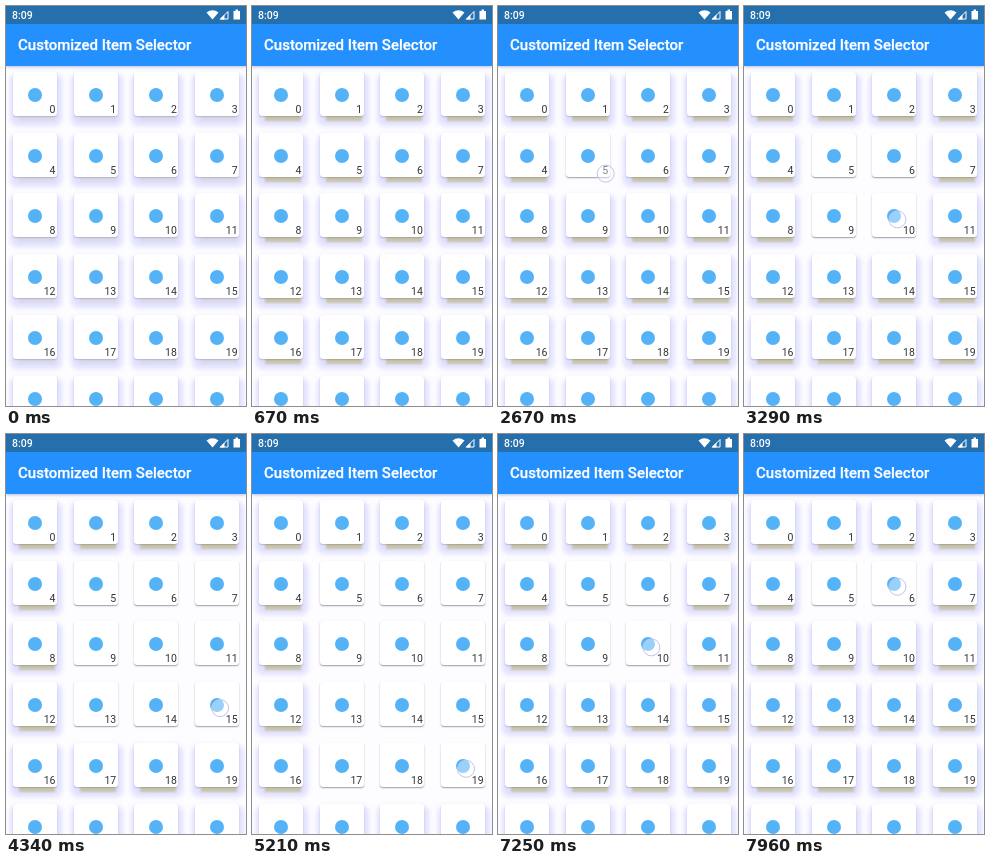
Write an HTML page that moves like this. It is 240 by 400 pixels and loops after 8 s.

```html
<!DOCTYPE html>
<html lang="en">
<head>
<meta charset="utf-8">
<title>Item selector</title>
<style>
html, body { margin: 0; width: 100%; height: 100%; overflow: hidden; background: #fdfdff; }
#stage { position: relative; width: 240px; height: 400px; overflow: hidden; background: #fdfdff; font-family: Roboto, sans-serif; }
#status { position: absolute; z-index: 3; width: 240px; height: 18px; background: #266fad; color: #fff; }
#status span { position: absolute; left: 6px; top: 3px; font: 500 10.5px/13px Roboto, sans-serif; }
#status svg { position: absolute; left: 0; top: 0; }
#bar { position: absolute; z-index: 2; top: 18px; width: 240px; height: 42px; background: #2490fd; color: #fff;
  font: 500 15px/43px Roboto, sans-serif; -webkit-text-stroke: .25px #fff; text-indent: 12px; white-space: nowrap;
  box-shadow: 0 1px 3px rgba(90, 90, 180, .4); }
.card { --k: 1; position: absolute; width: 44px; height: 44px; border-radius: 3px; background: #fff;
  box-shadow:
    0 1px 1.5px rgba(60, 60, 85, calc(.5 - .25 * var(--k))),
    calc(2px * var(--k)) calc(9px * var(--k)) 2px calc(-4px * var(--k)) rgba(196, 190, 150, calc(.8 * var(--k) * var(--tan))),
    1px calc(1px + 5px * var(--k)) calc(1px + 4px * var(--k)) calc(4px * var(--k)) rgba(190, 190, 255, calc(.45 * var(--k))); }
.card i { position: absolute; left: 15px; top: 16px; width: 14px; height: 14px; border-radius: 50%; background: #54b3f6; }
.card b { position: absolute; right: 1.5px; bottom: 0; font: 400 10.5px/12px Roboto, sans-serif; color: #333; }
#touch { position: absolute; z-index: 4; left: -9px; top: -9px; width: 16px; height: 16px; border-radius: 50%;
  border: 1px solid #c0c3ef; background: rgba(255, 255, 255, .4); }
</style>
</head>
<body>
<div id="stage">
  <div id="status">
    <span>8:09</span>
    <svg width="240" height="18" fill="#fff">
      <path d="M200.500 6.500Q206.500 2 212.500 6.500L206.500 13.500Z"/>
      <path d="M214.500 13L222 5.500V13Z" fill="none" stroke="#fff"/>
      <path d="M213.500 13.500L218.500 8.500V13.500Z"/>
      <path d="M227.500 5h2v-1.500h2.500v1.500h2v8.500h-6.500z"/>
    </svg>
  </div>
  <div id="bar">Customized Item Selector</div>
  <div id="touch"></div>
</div>
<script>
const LOOP = 8000, COLS = 4, COUNT = 24, PITCH = 60.7, LEFT = 7, TOP = 66;
const PRESS = 2040, START = 5, FADE = 200, SAMPLES = 20;
// drags: start time, duration, item reached
const drags = [
  [2500, 590, 10], [3750, 590, 15], [4630, 370, 19],
  [5210, 380, 18], [5960, 500, 10], [7250, 700, 6]
];

const stage = document.getElementById('stage');
const touch = document.getElementById('touch');
const cell = n => ({ col: n % COLS, row: Math.floor(n / COLS) });
const clamp = v => Math.min(1, Math.max(0, v));
const smooth = v => v * v * (3 - 2 * v);
const glide = v => (v + smooth(v)) / 2;
const mix = (a, b, p) => a + (b - a) * p;
const between = (v, a, b) => v >= Math.min(a, b) && v <= Math.max(a, b);

const cards = Array.from({ length: COUNT }, (_, n) => {
  const el = document.createElement('div');
  const { col, row } = cell(n);
  el.className = 'card';
  el.style.left = LEFT + PITCH * col + 'px';
  el.style.top = TOP + PITCH * row + 'px';
  el.innerHTML = `<i></i><b>${n}</b>`;
  stage.appendChild(el);
  return el;
});

// finger position in grid units
function finger(t) {
  let { col, row } = cell(START);
  for (const [at, span, item] of drags) {
    const p = glide(clamp((t - at) / span)), goal = cell(item);
    col = mix(col, goal.col, p);
    row = mix(row, goal.row, p);
  }
  return { col, row };
}

function selected(n, t) {
  if (t < PRESS) return false;
  const from = cell(START), to = finger(t), { col, row } = cell(n);
  return between(col, from.col, Math.round(to.col)) && between(row, from.row, Math.round(to.row));
}

// share of the last moments spent unselected
function lift(n, t) {
  let up = 0;
  for (let i = 0; i < SAMPLES; i++) up += !selected(n, t - FADE * i / SAMPLES);
  return smooth(up / SAMPLES);
}

function draw(t) {
  stage.style.setProperty('--tan', mix(.25, 1, smooth(clamp(t / 600))));
  cards.forEach((el, n) => el.style.setProperty('--k', lift(n, t)));
  const { col, row } = finger(t);
  touch.style.visibility = t < PRESS ? 'hidden' : 'visible';
  touch.style.transform = `translate(${LEFT + 25 + PITCH * col}px, ${TOP + 26 + PITCH * row}px)`;
}

const begin = performance.now();
function tick() {
  draw((performance.now() - begin) % LOOP);
  requestAnimationFrame(tick);
}
tick();
</script>
</body>
</html>
```
